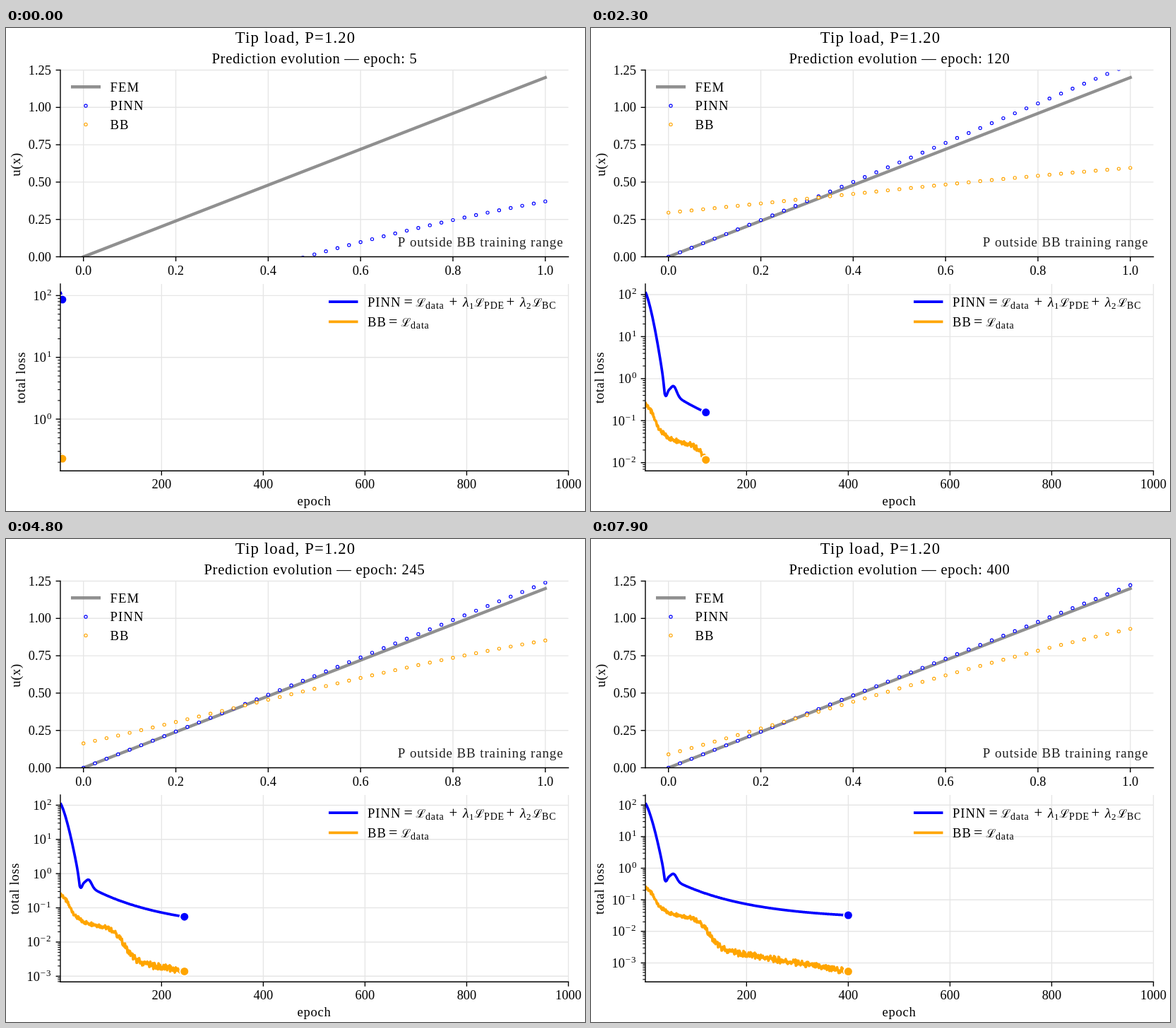
Animation of 820x683 px, one loop 8000 ms. Source, as an HTML page with a canvas:

```html
<!DOCTYPE html>
<html lang="en">
<head>
<meta charset="utf-8">
<title>Prediction evolution</title>
<style>
html, body { margin: 0; width: 820px; height: 683px; overflow: hidden; background: #fff; }
canvas { display: block; }
</style>
</head>
<body>
<canvas id="stage" width="820" height="683"></canvas>
<script>
const ctx = document.getElementById('stage').getContext('2d');
const BLUE = '#00f', ORANGE = '#ffa500', GREY = 'rgba(128,128,128,.87)', GRID = '#e6e6e6';
const LEFT = 77, RIGHT = 796.5, TOP1 = 59.5, BASE1 = 323.5, TOP2 = 362, BASE2 = 626.3;
const LOOP = 8000, STEP = 100;

const bell = (x, mid, width) => Math.exp(-(((x - mid) / width) ** 2));
const fall = e => 1 / (1 + Math.exp((e - 127) / 11));
const unsettled = e => Math.max(0, (45 - e) / 40) ** 2;

// Log10 losses against epoch: a slow tail, a steep start and a short bounce
function pinnLoss(e) {
  const tail = -1.62 + 1.8 * Math.exp(-e / 152);
  const start = 1.9 * Math.max(0, 1 - (e / 39) ** 1.5);
  return tail + start + .2 * bell(e, 57, 8) - .17 * bell(e, 41, 4);
}

const bbMean = e => -2.2 - .00268 * e + .9 * fall(e) + .7 * bell(e, 0, 25);

// The noise rests at the epochs that carry the marker
function bbLoss(e) {
  const s = Math.sin(e * 12.9898) * 43758.5453;
  const noise = e % 5 ? s - Math.floor(s) - .5 : 0;
  return bbMean(e) + noise * (.2 - .08 * fall(e));
}

// Predicted displacement at x
function pinn(x, e) {
  const excess = .31 * 10 ** (pinnLoss(Math.max(e, 45)) / 2) - .033;
  const fit = 1.2 * x + excess * x * x * (1.8 - .8 * x);
  const d = x - .5, first = .016 + .85 * d - .28 * d * d;
  return fit + (first - fit) * unsettled(e);
}

function bb(x, e) {
  const a = .04 + .513 * Math.exp(-e / 172);
  const b = .73 + .0005 * e - .298 * fall(e);
  const bend = .17 * (1 - fall(e));
  return a + (b - a) * x + bend * x * x * (1 - x) - .6 * unsettled(e);
}

function line(x0, y0, x1, y1, color = '#000', width = 1.4) {
  ctx.strokeStyle = color;
  ctx.lineWidth = width;
  ctx.beginPath();
  ctx.moveTo(x0, y0);
  ctx.lineTo(x1, y1);
  ctx.stroke();
}

function text(s, x, y, size = 18.4, align = 'left', track = .04, color = '#000') {
  ctx.font = size + 'px "Liberation Serif", "Times New Roman", serif';
  ctx.letterSpacing = size * track + 'px';
  ctx.textAlign = align;
  ctx.fillStyle = color;
  ctx.fillText(s, x, y);
}

function sideText(s, x, y) {
  ctx.save();
  ctx.translate(x, y);
  ctx.rotate(-Math.PI / 2);
  text(s, 0, 0, 18.6, 'center', .035);
  ctx.restore();
}

function disc(x, y, r, color) {
  ctx.fillStyle = color;
  ctx.beginPath();
  ctx.arc(x, y, r, 0, 7);
  ctx.fill();
}

function ring(x, y, color) {
  disc(x, y, 2.1, '#fff');
  ctx.strokeStyle = color;
  ctx.lineWidth = 1.15;
  ctx.stroke();
}

function clipped(top, base, paint) {
  ctx.save();
  ctx.beginPath();
  ctx.rect(LEFT, top, RIGHT - LEFT, base - top);
  ctx.clip();
  paint();
  ctx.restore();
}

function axes(top, base) {
  ctx.lineCap = 'square';
  line(LEFT, top, LEFT, base);
  line(LEFT, base, RIGHT, base);
  ctx.lineCap = 'butt';
}

function predictionPlot(e) {
  const px = x => LEFT + (x + .05) * (RIGHT - LEFT) / 1.1;
  const py = y => BASE1 - y * (BASE1 - TOP1) / 1.25;
  for (let i = 0; i < 6; i++) {
    const x = px(i / 5), y = py(i / 4);
    line(x, TOP1, x, BASE1, GRID);
    if (i) line(LEFT, y, RIGHT, y, GRID);
    line(x, BASE1, x, BASE1 + 6.4);
    line(LEFT - 6.4, y, LEFT, y);
    text((i / 5).toFixed(1), x, 348.5, 18.4, 'center', 0);
    text((i / 4).toFixed(2), 64, y + 6, 18.4, 'right', 0);
  }
  clipped(TOP1, BASE1, () => {
    ctx.lineCap = 'square';
    line(px(0), py(0), px(1), py(1.2), GREY, 4.4);
    ctx.lineCap = 'butt';
    for (const [f, color] of [[pinn, BLUE], [bb, ORANGE]])
      for (let i = 0; i <= 40; i++) ring(px(i / 40), py(f(i / 40, e)), color);
  });
  axes(TOP1, BASE1);
  line(92, 83.3, 134, 83.3, GREY, 4.4);
  ring(113, 110, BLUE);
  ring(113, 136.4, ORANGE);
  ['FEM', 'PINN', 'BB'].forEach((s, i) => text(s, 147.5, 89.8 + i * 26.5, 18.7, 'left', .06));
  text('P outside BB training range', 789.5, 309, 19, 'right', .046, '#222');
  sideText('u(x)', 19.5, 193);
}

function lossPlot(e) {
  const low = bbMean(e) - .06, high = 2.05, pad = (high - low) * .05;
  const min = low - pad, max = high + pad;
  const px = x => LEFT + (x - 1) * (RIGHT - LEFT) / 999;
  const py = v => BASE2 - (v - min) / (max - min) * (BASE2 - TOP2);
  for (let i = 200; i <= 1000; i += 200) {
    line(px(i), TOP2, px(i), BASE2, GRID);
    line(px(i), BASE2, px(i), BASE2 + 6.4);
    text(i, px(i), 651, 18.4, 'center', 0);
  }
  for (let k = -4; k <= 2; k++) {
    for (let m = 1; m < 10; m++) {
      const v = k + Math.log10(m), y = py(v);
      if (v < min || v > max) continue;
      if (m > 1) {
        line(LEFT - 3.7, y, LEFT, y, '#000', 1.1);
        continue;
      }
      line(LEFT, y, RIGHT, y, GRID);
      line(LEFT - 6.4, y, LEFT, y);
      text(String(k).replace('-', '−'), 64.5, y - .5, 13, 'right', k < 0 ? .08 : 0);
      text('10', k < 0 ? 48 : 57, y + 6.5, 18.4, 'right', 0);
    }
  }
  clipped(TOP2, BASE2, () => {
    for (const [f, color] of [[pinnLoss, BLUE], [bbLoss, ORANGE]]) {
      ctx.strokeStyle = color;
      ctx.lineWidth = 3.7;
      ctx.lineJoin = 'round';
      ctx.beginPath();
      for (let i = 1; i <= e; i++) ctx.lineTo(px(i), py(f(i)));
      ctx.stroke();
      disc(px(e), py(f(e)), 7.3, '#fff');
      disc(px(e), py(f(e)), 5.5, color);
    }
  });
  axes(TOP2, BASE2);
  lossLegend();
  text('epoch', 436.5, 674.5, 18.6, 'center');
  sideText('total loss', min > -1 ? 27 : 18, 494.5);
}

function lossLegend() {
  const term = (x, y, sub) => {
    text('ℒ', x, y, 16.5);
    text(sub, x + 13.5, y + 3, 14, 'left', .06);
  };
  const weight = (x, y, n) => {
    text('+', x - 18.5, y, 21);
    ctx.save();
    ctx.translate(x, y);
    ctx.transform(1, 0, -.15, 1, 0, 0);
    text('λ', 0, 0, 19);
    ctx.restore();
    text(n, x + 10, y + 3, 13);
  };
  const y1 = 393.5, y2 = 421.8;
  line(457, 387.2, 498.5, 387.2, BLUE, 3.7);
  line(457, 415.3, 498.5, 415.3, ORANGE, 3.7);
  text('PINN', 512, y1, 18.7, 'left', .05);
  text('=', 563.5, y1, 22);
  term(580.5, y1, 'data');
  weight(646, y1, '1');
  term(663.5, y1, 'PDE');
  weight(727, y1, '2');
  term(745.5, y1, 'BC');
  text('BB', 512, y2, 18.7, 'left', .05);
  text('=', 542, y2, 22);
  term(559.5, y2, 'data');
}

function draw(now) {
  const e = 5 * (Math.floor(now % LOOP / STEP) + 1);
  ctx.fillStyle = '#fff';
  ctx.fillRect(0, 0, 820, 683);
  text('Tip load, P=1.20', 410, 21, 22.6, 'center', .053);
  text('Prediction evolution — epoch: ' + e, 437, 50, 20.5, 'center', .037);
  predictionPlot(e);
  lossPlot(e);
}

let start;
function tick(now) {
  start ??= now;
  draw(now - start);
  requestAnimationFrame(tick);
}
draw(0);
requestAnimationFrame(tick);
</script>
</body>
</html>
```
